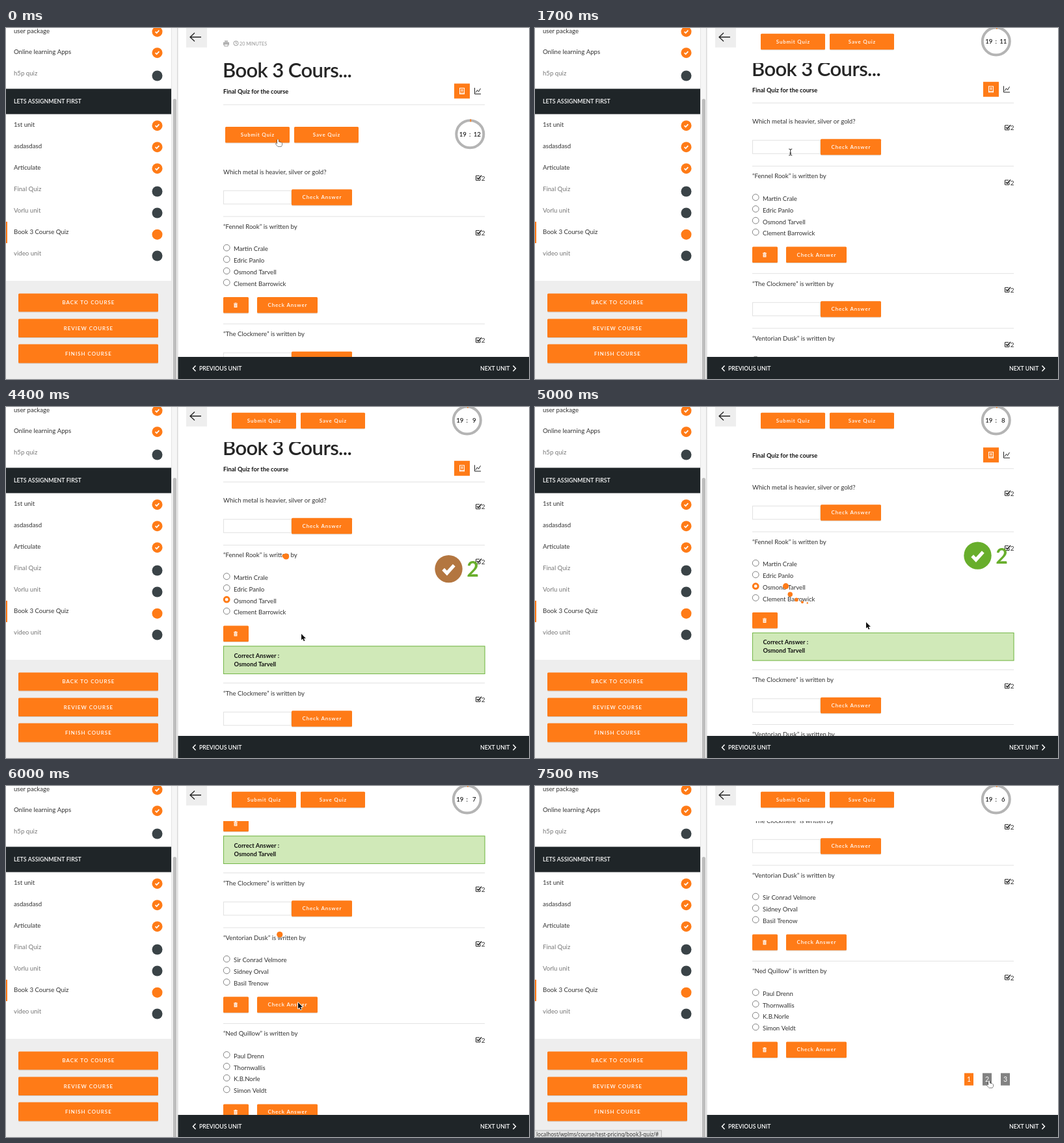
Write an HTML page with a canvas that moves like this. It is 804 px wide and 540 px high and loops after 7.6 s.

```html
<!DOCTYPE html>
<html lang="en">
<head>
<meta charset="utf-8">
<title>Quiz</title>
<style>
html, body { margin: 0; width: 100%; height: 100%; overflow: hidden; background: #fff; }
canvas { display: block; width: 804px; height: 540px; }
</style>
</head>
<body>
<canvas id="stage"></canvas>
<script>
const LOOP = 7600, STEP = 100;
const STICK = 1400, FOCUS = 2100, PICK = 3550, ANSWER = 4300, LOADED = 6300, LINK = 7200;
const ORANGE = '#ff7b17', DARK = '#1f2528', INK = '#333', SLATE = '#3a4347', LINE = '#e2e2e2';
const canvas = document.getElementById('stage');
const scale = window.devicePixelRatio || 1;
canvas.width = 804 * scale;
canvas.height = 540 * scale;
const c = canvas.getContext('2d');

const questions = [
  { text: 'Which metal is heavier, silver or gold?' },
  { text: '“Fennel Rook” is written by', answer: 2,
    options: ['Martin Crale', 'Edric Panlo', 'Osmond Tarvell', 'Clement Barrowick'] },
  { text: '“The Clockmere” is written by' },
  { text: '“Ventorian Dusk” is written by',
    options: ['Sir Conrad Velmore', 'Sidney Orval', 'Basil Trenow'] },
  { text: '“Ned Quillow” is written by',
    options: ['Paul Drenn', 'Thornwallis', 'K.B.Norle', 'Simon Veldt'] }
];
// label, text centre, state
const units = [
  ['user package', 4.5, 'done'], ['Online learning Apps', 37, 'done'], ['h5p quiz', 70, 'open'],
  ['1st unit', 149, 'done'], ['asdasdasd', 182, 'done'], ['Articulate', 215, 'done'],
  ['Final Quiz', 248, 'open'], ['Vorlu unit', 281, 'open'],
  ['Book 3 Course Quiz', 314, 'active'], ['video unit', 347, 'open']
];
// time, x, y
const cursorPath = [
  [0, 418, 171], [900, 418, 171], [1600, 397, 193], [2000, 380, 185], [2600, 380, 185],
  [3200, 363, 290], [3500, 340, 297], [3700, 340, 297], [4050, 440, 349], [4400, 454, 349],
  [5000, 509, 331], [5400, 509, 331], [6000, 449, 333], [6400, 470, 345], [7000, 695, 452], [7500, 698, 453]
];
const firstScroll = [[600, 0], [800, 16], [1100, 50], [1400, 77.5]];
const secondScroll = [[4800, 0], [5000, 20.5], [5400, 180], [5700, 265], [6000, 291], [6300, 378], [6400, 387]];
// share of a turn, then how far each trailing dot lags in degrees
const trail = [
  [.05, 0, 0, 0, 0], [.1, 6, 12, 18, 21], [.2, 24, 42, 54, 66],
  [.38, 27, 51, 69, 84], [.59, 6, 12, 18, 21], [.95, 0, 0, 0, 0]
];

function ease(x) {
  const bez = (s, a, b) => 3 * (1 - s) ** 2 * s * a + 3 * (1 - s) * s * s * b + s ** 3;
  let lo = 0, hi = 1;
  for (let i = 0; i < 20; i++) {
    const mid = (lo + hi) / 2;
    if (bez(mid, .25, .25) < x) lo = mid; else hi = mid;
  }
  return bez(lo, .1, 1);
}

function track(keys, t, curve = u => u) {
  const i = keys.findIndex(k => k[0] > t);
  if (i === 0) return keys[0].slice(1);
  if (i < 0) return keys[keys.length - 1].slice(1);
  const a = keys[i - 1], b = keys[i], u = curve((t - a[0]) / (b[0] - a[0]));
  return a.slice(1).map((v, n) => v + (b[n + 1] - v) * u);
}

function rect(x, y, w, h, fill) { c.fillStyle = fill; c.fillRect(x, y, w, h); }

function box(x, y, w, h, stroke, fill) {
  rect(x, y, w, h, fill);
  c.strokeStyle = stroke;
  c.lineWidth = 1;
  c.strokeRect(x + .5, y + .5, w - 1, h - 1);
}

function round(x, y, w, h, r, fill) {
  c.fillStyle = fill;
  c.beginPath();
  c.roundRect(x, y, w, h, r);
  c.fill();
}

function disc(x, y, r, fill) {
  c.fillStyle = fill;
  c.beginPath();
  c.arc(x, y, r, 0, 7);
  c.fill();
}

function ring(x, y, r, width, stroke) {
  c.strokeStyle = stroke;
  c.lineWidth = width;
  c.beginPath();
  c.arc(x, y, r, 0, 7);
  c.stroke();
}

function lines(width, stroke, ...paths) {
  c.strokeStyle = stroke;
  c.lineWidth = width;
  c.beginPath();
  for (const p of paths)
    for (let i = 0; i < p.length; i += 2) c[i ? 'lineTo' : 'moveTo'](p[i], p[i + 1]);
  c.stroke();
}

function text(s, x, y, color = INK, size = 9.65, weight = 400, align = 'left', spacing = 0) {
  c.font = `${weight} ${size}px Lato, "Open Sans", sans-serif`;
  c.letterSpacing = spacing + 'px';
  c.textAlign = align;
  c.fillStyle = color;
  c.fillText(s, x, y + size * .35);
}

function button(label, x, y, w, h = 24.5, size = 8) {
  round(x, y + 1, w, h, 1.5, 'rgba(0,0,0,.13)');
  round(x, y, w, h, 1.5, ORANGE);
  if (label) text(label, x + w / 2 + .4, y + h / 2, '#fff', size, 600, 'center', size === 8 ? .8 : 1);
}

function tick(x, y, k, color = '#fff') {
  lines(2 * k, color, [x - 3.2 * k, y, x - k, y + 2.3 * k, x + 3.2 * k, y - 2.3 * k]);
}

function sidebar() {
  rect(0, 0, 254, 540, '#fff');
  rect(0, 93.5, 254, 39, DARK);
  text('LETS ASSIGNMENT FIRST', 12, 113, '#fff', 8.8, 600);
  rect(0, 298, 2, 33, ORANGE);
  for (const [label, y, state] of units) {
    text(label, 12, y, state === 'open' ? '#777' : INK);
    const cy = y + { done: 1.2, open: 3.5, active: 3.7 }[state];
    disc(232.5, cy, 8, state === 'open' ? SLATE : ORANGE);
    if (state === 'done') tick(232.5, cy, .9);
  }
  rect(0, 389, 254, 151, '#eee');
  button('BACK TO COURSE', 19, 408.5, 215, 28, 7.9);
  button('REVIEW COURSE', 19, 447.5, 215, 28.5, 7.9);
  button('FINISH COURSE', 19, 486.5, 215, 29, 7.9);
  rect(254, 0, 10, 540, '#f6f6f6');
  rect(254, 0, 1, 540, '#e4e4e4');
  rect(263, 0, 1.5, 540, '#d9d9d9');
  round(256.7, 109, 5.3, 440, 2.6, '#bdbdbd');
}

function header(dy) {
  c.save();
  c.translate(0, dy);
  rect(336, 19.5, 5, 2, '#aaa');
  rect(334, 22, 9, 4.5, '#aaa');
  box(335.5, 24.5, 6, 4, '#aaa', '#fff');
  ring(353.5, 23.5, 3.5, 1, '#999');
  lines(1, '#999', [353.5, 21.3, 353.5, 23.8, 355, 23.8]);
  text('20 MINUTES', 359, 24, '#a5a5a5', 7.2, 600);
  text('Book 3 Cours...', 333, 65.5, '#252525', 31, 600, 'left', -.6);
  text('Final Quiz for the course', 334, 98, '#111', 9.2, 700);
  rect(689, 85.5, 24, 23, ORANGE);
  c.strokeStyle = '#fff';
  c.lineWidth = 1;
  c.strokeRect(697.5, 92.5, 7, 9);
  lines(1, '#fff', [699, 95, 703, 95], [699, 97, 703, 97], [697, 100, 705, 100]);
  lines(1, '#222', [720.5, 92, 720.5, 101.5, 730, 101.5], [722, 99.5, 724.5, 95.5, 726.5, 98, 729.5, 93]);
  rect(334, 117.5, 402, 1, LINE);
  c.restore();
}

function controls(bx, by, cx, cy, t) {
  button('Submit Quiz', bx, by, 99);
  button('Save Quiz', bx + 106, by, 99);
  ring(cx, cy, 21, 4, '#b4b4b4');
  lines(1.6, ORANGE, [cx + 1, cy - 23, cx + 1, cy - 19]);
  const seconds = 12 - Math.max(0, Math.floor((t - 600) / 1000));
  ['19', ':', seconds].forEach((s, i) => text(s, cx + (i - 1) * 11, cy, '#111', 9.7, 500, 'center'));
}

function trash(y) {
  button('', 334, y, 39);
  rect(350, y + 9.5, 6, 1, '#fff');
  rect(351.7, y + 8.7, 2.6, 1, '#fff');
  rect(350.6, y + 11, 4.8, 5, '#fff');
  lines(.6, ORANGE, [352.2, y + 12, 352.2, y + 15.2], [353.8, y + 12, 353.8, y + 15.2]);
}

function badge(y, t) {
  const u = ease(Math.min(1, (t - ANSWER) / 500));
  const mix = (a, b) => Math.round(a + (b - a) * u);
  disc(680.5, y, 21.2, `rgb(${mix(210, 104)},${mix(95, 174)},${mix(72, 44)})`);
  tick(680.5, y + .5, 2.6);
  text('2', 717.5, y + 1, '#68ae2c', 32, 700, 'center');
}

function score(y) {
  lines(1, '#222', [729, y, 729, y + 3.5, 722.5, y + 3.5, 722.5, y - 3.5, 728, y - 3.5]);
  lines(1.5, '#222', [724, y - .5, 726, y + 1.5, 731, y - 4]);
  text('2', 730.7, y + .5, INK, 10);
}

function drawQuestion(q, y, t, last) {
  text(q.text, 334, y);
  score(y + 9.5);
  let end;
  if (q.options) {
    q.options.forEach((label, i) => {
      const cy = y + 32.5 + i * 17.8;
      if (i === q.answer && t >= PICK) ring(339.2, cy, 3.9, 3, ORANGE);
      else ring(339.2, cy, 4.9, .9, '#777');
      text(label, 350, cy + 2);
    });
    const by = y + 37.2 + q.options.length * 17.8;
    trash(by);
    end = by + 41.2;
    if ('answer' in q && t >= ANSWER) {
      box(334, by + 31, 402.5, 43.5, '#74b648', '#d0e9b8');
      text('Correct Answer :', 350.5, by + 46, '#111', 9.3, 700);
      text(q.options[q.answer], 350.5, by + 59, '#111', 9.3, 700);
      badge(y + 21, t);
      end += 47;
    } else button('Check Answer', 386, by, 93);
  } else {
    box(334, y + 28.5, 105, 21.5, LINE, '#fff');
    button('Check Answer', 439, y + 27, 93);
    end = y + 68.7;
  }
  if (!last) rect(334, end - .5, 402, 1, LINE);
  return end + 15.6;
}

function content(t, scroll, moved) {
  let y = 221.3 - scroll - moved;
  if (t >= FOCUS && t < PICK) var caret = Math.floor((t - FOCUS) / 500) % 2 === 0;
  const top = y;
  questions.forEach((q, i) => { y = drawQuestion(q, y, t, i === questions.length - 1); });
  if (caret) rect(337.7, top + 33, 1, 12, '#222');
  [1, 2, 3].forEach((n, i) => {
    rect(660 + i * 28, y - 8.5, 14, 19, i ? '#828282' : ORANGE);
    text(n, 667 + i * 28, y + 1, '#fff', 10.5, 400, 'center');
  });
}

function chrome() {
  rect(277, 0, 32, 30, '#eee');
  lines(1.3, '#222', [300, 14, 283, 14], [290, 7.5, 283, 14, 290, 20.5]);
  rect(264, 506, 540, 34, DARK);
  text('PREVIOUS UNIT', 297, 523.5, '#fff', 8.7, 600);
  text('NEXT UNIT', 729, 523.5, '#fff', 8.7, 600);
  lines(1.5, '#fff', [291.5, 519.5, 287.5, 523.8, 291.5, 528], [779.5, 519.5, 783.5, 523.8, 779.5, 528]);
}

function loader(t) {
  const p = (t - 4295) / 1700 % 1, head = ease(p) * 360, em = 44;
  const lag = [0, ...track(trail, p, ease)];
  [.1, .08, .06, .04, .023].forEach((r, i) => {
    const a = (head - lag[i] - 90) * Math.PI / 180;
    disc(420.5 + .83 * em * Math.cos(a), 265 + .83 * em * Math.sin(a), r * em + .2, ORANGE);
  });
}

const arrow = new Path2D('M0 0V9.6L2.2 7.6L3.8 11.2L5.4 10.5L3.9 7H7Z');
const hand = new Path2D('M-1 1Q0-1 1 1V4.5Q2.2 3.5 3 5Q4.2 4.2 4.8 5.4Q6.2 5 6.2 6.5V8.5Q6 10 5 11.5H0L-3.5 7Q-3.5 5.5-1 7Z');

function cursor(t) {
  const [x, y] = track(cursorPath, t);
  c.save();
  c.translate(x, y);
  c.lineJoin = 'round';
  if (t >= 1500 && t < 2700) {
    lines(1, '#222', [-2.5, -5, 0, -4, 2.5, -5], [0, -4, 0, 4], [-2.5, 5, 0, 4, 2.5, 5], [-1.3, 1.5, 1.3, 1.5]);
  } else {
    const pointing = t < 900 || t >= 7000 || (t >= 4000 && t < ANSWER);
    const shape = pointing ? hand : arrow;
    c.lineWidth = pointing ? 1 : 1.6;
    c.strokeStyle = pointing ? '#111' : '#fff';
    c.fillStyle = pointing ? '#fff' : '#111';
    c.stroke(shape);
    c.fill(shape);
  }
  c.restore();
}

function statusBar() {
  box(-1, 529.5, 196, 12, '#bbb', '#e6e6e6');
  c.font = '8px "Noto Sans", sans-serif';
  c.letterSpacing = '0px';
  c.textAlign = 'left';
  c.fillStyle = '#333';
  c.fillText('localhost/wplms/course/test-pricing/book3-quiz/#', 2, 538.5);
}

function draw(t) {
  const [scroll] = track(firstScroll, t), [moved] = track(secondScroll, t);
  const stuck = t >= STICK;
  c.setTransform(scale, 0, 0, scale, 0, 0);
  rect(0, 0, 804, 540, '#fff');
  header(stuck ? -2.7 - moved : -scroll);
  content(t, scroll, moved);
  if (stuck) {
    rect(264, 0, 540, 54, '#fff');
    controls(347, 8.7, 708.8, 20.5, t);
  } else controls(337, 152 - scroll, 713.3, 163.3 - scroll, t);
  chrome();
  sidebar();
  if (t >= ANSWER && t < LOADED) loader(t);
  if (t >= LINK) statusBar();
  cursor(t);
}

const start = performance.now();
function frame() {
  draw(Math.floor((performance.now() - start) / STEP) * STEP % LOOP);
  requestAnimationFrame(frame);
}
frame();
</script>
</body>
</html>
```
